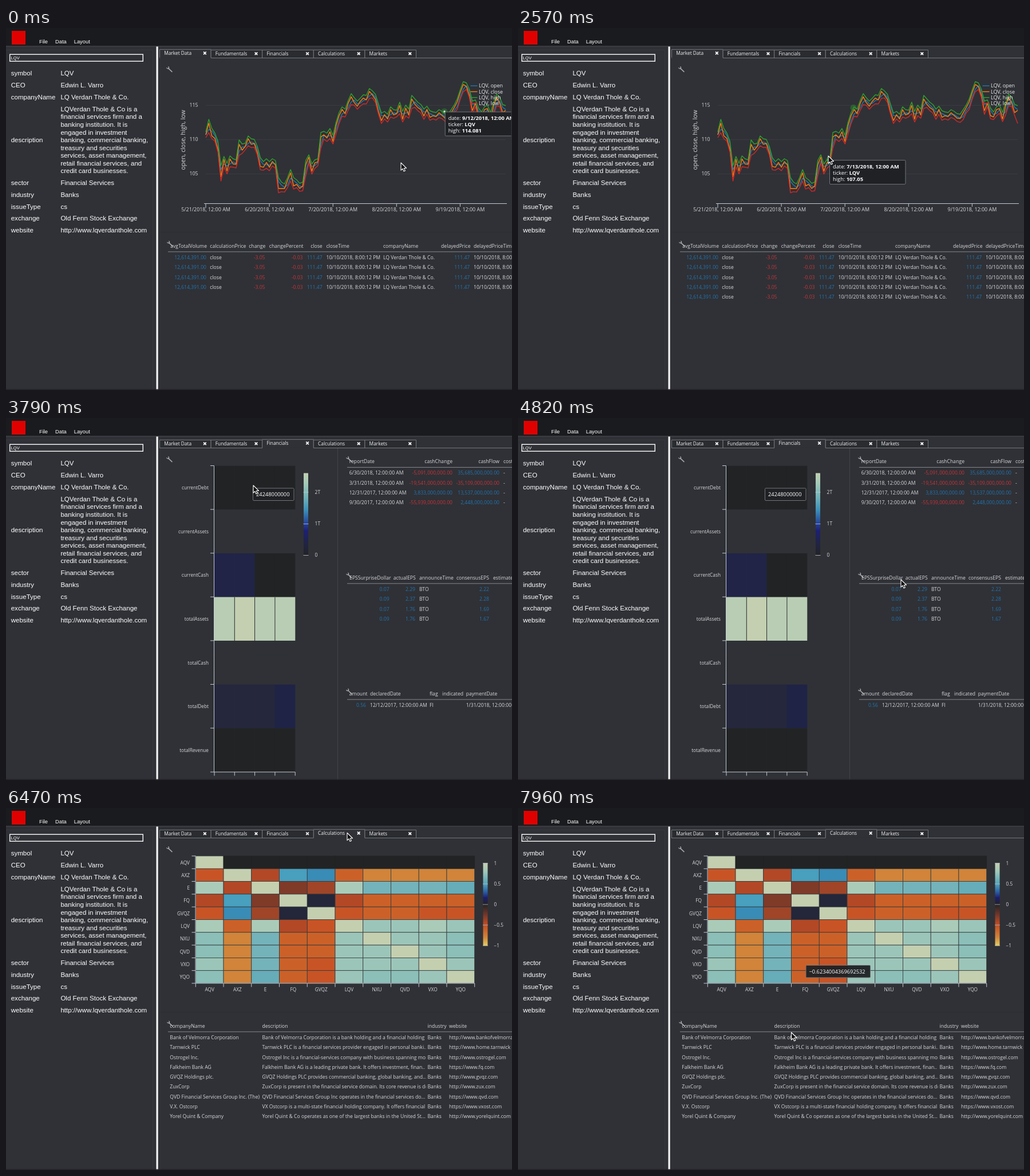
An HTML page that plays this animation: 884 by 634 pixels, repeating every 8 s.

```html
<!DOCTYPE html>
<html lang="en">
<head>
<meta charset="utf-8">
<title>Market dashboard</title>
<style>
  html, body { margin: 0; width: 100%; height: 100%; overflow: hidden; }
  svg { display: block; width: 884px; height: 634px; font-family: "Open Sans", "Noto Sans", sans-serif; }
  text { white-space: pre; }
  .ui { font-family: "Liberation Sans", Arial, sans-serif; }
</style>
</head>
<body>
<svg id="stage" viewBox="0 0 884 634" xmlns="http://www.w3.org/2000/svg"></svg>
<script>
const NS = "http://www.w3.org/2000/svg";
const stage = document.getElementById("stage");
const BG = "#2f3136", BLUE = "#2372ae", RED = "#c5343a", LIGHT = "#d6d8da", AXIS = "#c3cbd6", DARK = "#222324";
const TICKER = "LQV", COMPANY = "LQ Verdan Thole & Co.";

function el(parent, tag, attrs = {}) {
  const node = document.createElementNS(NS, tag);
  for (const name in attrs) node.setAttribute(name, attrs[name]);
  parent.appendChild(node);
  return node;
}
const rect = (g, x, y, width, height, fill, more) => el(g, "rect", { x, y, width, height, fill, ...more });
const line = (g, d, stroke, width = 1, more) => el(g, "path", { d, stroke, "stroke-width": width, fill: "none", ...more });
// y is the middle of the capitals
function label(g, x, y, str, size = 8.64, anchor = "start", fill = LIGHT, more) {
  const node = el(g, "text", { x, y: y + size * 0.35, "font-size": size, "text-anchor": anchor, fill, ...more });
  node.textContent = str;
  return node;
}
const ui = (g, x, y, str, size = 11.55) => label(g, x, y, str, size, "start", "#fff", { class: "ui" });
const show = (node, on) => node.setAttribute("display", on ? "inline" : "none");

const defs = el(stage, "defs");
function clip(id, x, y, w, h) {
  rect(el(defs, "clipPath", { id }), x, y, w, h, "#000");
}
function gradient(id, colors) {
  const g = el(defs, "linearGradient", { id, x1: 0, y1: 0, x2: 0, y2: 1 });
  colors.forEach(([offset, color]) => el(g, "stop", { offset, "stop-color": color }));
}
clip("pane", 267, 32, 615.5, 602);
clip("desc", 440, 370, 293.5, 200);
gradient("sums", [[0, "#c0d0b0"], [.12, "#a5cab8"], [.3, "#6fb1b9"], [.45, "#3c8fb7"], [.6, "#27479a"],
  [.7, "#1d2072"], [.85, "#212444"], [1, DARK]]);
gradient("corr", [[0, "#c4cfb0"], [.1, "#a3c9b9"], [.25, "#55a5ba"], [.35, "#2a5fa5"], [.42, "#1c1e70"], [.5, DARK],
  [.62, "#71362a"], [.72, "#b34826"], [.8, "#cb5f29"], [.9, "#d2863b"], [1, "#e4cd62"]]);

// Frame of the application
rect(stage, 0, 0, 884, 634, BG);
rect(stage, 0, 0, 884, 31.5, "#1a1b1e");
rect(stage, 0, 31.5, 884, 1, "#4a4c50");
rect(stage, 10, 5, 24, 24, "#e00000");
[[58, "File"], [86, "Data"], [118.7, "Layout"]].forEach(([x, s]) => ui(stage, x, 24, s, 9.36));
line(stage, "M0 38.5H256.5V634", "#36383d");
rect(stage, 6.7, 46.2, 232.6, 12, BG, { stroke: "#fff", "stroke-width": 1.4 });
ui(stage, 8.6, 52.4, TICKER, 7.6);
rect(stage, 262.5, 32.5, 3.2, 602, "#f6f6f6");

[["symbol", TICKER, 79], ["CEO", "Edwin L. Varro", 100], ["companyName", COMPANY, 120.8], ["description", "", 196],
 ["sector", "Financial Services", 271], ["industry", "Banks", 291.7], ["issueType", "cs", 312.5],
 ["exchange", "Old Fenn Stock Exchange", 333.3], ["website", "http://www.lqverdanthole.com", 354]
].forEach(([name, value, y]) => { ui(stage, 8.7, y, name); ui(stage, 95.4, y, value); });
["LQVerdan Thole & Co is a", "financial services firm and a", "banking institution. It is", "engaged in investment",
 "banking, commercial banking,", "treasury and securities", "services, asset management,", "retail financial services, and",
 "credit card businesses."].forEach((s, i) => ui(stage, 95.4, 141.8 + i * 13.56, s));

// Tabs
const tabs = ["Market Data", "Fundamentals", "Financials", "Calculations", "Markets"].map((name, i) => {
  const x = 268.5 + i * 89.6, g = el(stage, "g");
  const box = line(g, `M${x} 52.5V38.5H${x + 89.6}V52.5`, "#7b7e83", .9);
  const text = label(g, x + 7.7, 44.8, name, 8.35, "start", "#f2f2f2");
  const cross = line(g, `M${x + 76.6} 42.6l4.6 4.6m0 -4.6l-4.6 4.6`, "#fff", 1.7);
  return { x, box, text, cross };
});
const baseLine = line(stage, "", "#7b7e83", .9);
function setTabs(active, hover) {
  tabs.forEach((tab, i) => {
    const lift = i === active ? "translate(0 -0.9)" : "";
    tab.text.setAttribute("transform", lift);
    tab.cross.setAttribute("transform", lift);
    tab.box.setAttribute("transform", lift);
    tab.box.setAttribute("fill", i === hover ? "#646568" : i === active ? BG : "#2a2c30");
  });
  const x = tabs[active].x;
  baseLine.setAttribute("d", `M268 52.5H${x}M${x + 89.6} 52.5H884`);
}

// Shared parts of the panels
const views = [0, 1, 2].map(() => el(stage, "g"));
const [market, finance, calc] = views;

function wrench(g, x, y) {
  line(g, `M${x + 3.4} ${y + 3.4}L${x + 10} ${y + 9.6}`, "#a9abad", 1.5, { "stroke-linecap": "round" });
  line(g, `M${x + .6} ${y + 2.4}q1 2.6 3.4 1.5q1.6 -1.8 -.6 -3.4`, "#a9abad", 1.2);
}
// columns: [title, title x, value x, anchor]
function table(g, x, y, cols, rows) {
  wrench(g, x - 2, y - 9);
  line(g, `M${x} ${y + 10.4}H884`, "#909397", .9);
  cols.forEach(([title, tx, , anchor]) => label(g, tx, y, title, 8.64, anchor));
  return rows.map((row, r) => {
    const group = el(g, "g");
    row.forEach((value, c) => {
      const [title, , vx, anchor] = cols[c];
      const number = anchor === "end";
      const fill = !number ? LIGHT : value[0] === "-" ? RED : BLUE;
      const more = title === "description" ? { "clip-path": "url(#desc)" } : {};
      label(group, vx, y + 20.4 + r * 17.3, value, 8.64, anchor, fill, more);
    });
    return group;
  });
}
const left = (title, x) => [title, x, x, "start"];
const right = (title, x, vx = x) => [title, x, vx, "end"];

function tooltip(g, x, y, w, h, lines) {
  const tip = el(g, "g", { "clip-path": "url(#pane)" });
  rect(tip, x, y, w, h, "#1f2124", { "fill-opacity": .95, stroke: "#73767a", rx: 1.5 });
  lines.forEach(([name, value], i) => {
    const t = label(tip, x + 5.5, y + 10.8 + i * 11, name, 9.3, "start", "#fff");
    if (value) el(t, "tspan", { "font-weight": 700 }).textContent = value;
  });
  return tip;
}

// Price chart
const high = [182, 160, 176, 184, 198, 241, 225, 237, 224, 229, 231, 196, 203, 202, 189, 194, 195, 207, 227, 234,
  229, 234, 229, 232, 262, 270, 273, 262, 248, 262, 266, 272, 270, 232, 222, 238, 231, 229, 183, 181,
  184, 176, 188, 165, 148, 138, 142, 127, 115, 122, 128, 123, 117, 118, 106, 110, 116, 133, 149, 146,
  151, 138, 143, 144, 130, 146, 135, 142, 118, 124, 130, 134, 142, 137, 145, 147, 148, 143, 146, 150,
  151, 143, 135, 124, 108, 94, 96, 107, 128, 126, 140, 147, 138, 135, 148, 131, 116, 121, 134, 136];
let seed = 7;
const rand = () => (seed = (seed * 16807) % 2147483647) / 2147483647;
const prices = { open: [], close: [], high: [], low: [] };
high.forEach((y, i) => {
  const step = i ? y - high[i - 1] : 0;
  const range = Math.min(27, 10 + Math.abs(step) * .4 + rand() * 5);
  const fall = Math.max(-1, Math.min(1, step / 10));
  prices.high.push(y);
  prices.low.push(y + range + (i === 99 ? 16 : 0));
  prices.close.push(y + range * (.5 + .22 * fall));
  prices.open.push(y + range * (.5 - .25 * fall));
});
const colors = { open: "#1f77b4", close: "#ff7f0e", high: "#2ca02c", low: "#d62728" };

wrench(market, 280, 67);
[115, 110, 105].forEach((v, i) => {
  const y = 135 + i * 60;
  line(market, `M349 ${y + .5}H873`, "#393b40");
  label(market, 335.5, y, v, 8.8, "end");
});
label(market, 0, 0, "open, close, high, low", 10.6, "middle", LIGHT, { transform: "translate(309.5 196) rotate(-90)" });
line(market, "M346 307.5H875", AXIS);
["5/21", "6/20", "7/20", "8/20", "9/19"].forEach((day, i) => {
  const x = 349 + i * 111.1;
  line(market, `M${x} 307V${i ? 313 : 315}`, AXIS);
  label(market, x, 318, day + "/2018, 12:00 AM", 8.95, "middle");
});
for (const name in prices) {
  const points = prices[name].map((y, i) => `${(349 + i * 5.293).toFixed(1)},${y.toFixed(1)}`).join(" ");
  el(market, "polyline", { points, fill: "none", stroke: colors[name], "stroke-width": 1.4, "stroke-linejoin": "round" });
}
Object.keys(colors).forEach((name, i) => {
  const y = 101.3 + i * 10.2;
  line(market, `M811.5 ${y}h12`, colors[name], 1.4);
  label(market, 826, y, `${TICKER}, ${name}`, 8.95, "start", "#eee");
});

line(market, "M268 357.5H884", "#2b2d31");
const marketRow = ["12,614,391.00", "close", "-3.05", "-0.03", "111.47", "10/10/2018, 8:00:12 PM", COMPANY, "111.47", "10/10/2018, 8:00:12 PM"];
const marketRows = table(market, 283, 381.5, [
  right("avgTotalVolume", 351, 350), left("calculationPrice", 356.3), right("change", 453.3, 452.5),
  right("changePercent", 519.5, 518.5), right("close", 552.6), left("closeTime", 559.5),
  left("companyName", 659), right("delayedPrice", 811.5, 810.3), left("delayedPriceTime", 817)
], Array(5).fill(marketRow));

function pricePoint(x, y, day, value) {
  const g = el(market, "g");
  el(g, "circle", { cx: x, cy: y, r: 5.5, fill: "#2ca02c", "fill-opacity": .4 });
  rect(g, x - 1.5, y - 1.5, 3, 3, "#d5efd0");
  tooltip(g, x + 1.2, y + .8, 132.5, 42, [["date: ", day + "/2018, 12:00 AM"], ["ticker: ", TICKER], ["high: ", value]]);
  return g;
}
const ghost = el(market, "circle", { cx: 586, cy: 139.5, r: 5.5, fill: "#2ca02c", "fill-opacity": .4 });
const septTip = pricePoint(766, 146.2, "9/12", "114.081");
const lateTip = pricePoint(586, 139.5, "7/24", "114.69");
const julyTip = pricePoint(543.3, 230.8, "7/13", "107.05");

// Financials
wrench(finance, 280, 67);
const GREEN = "#b9cdb4", NAVY = "#212447", DIM = "#25273d", DUSK = "#1f2346";
[["currentDebt", DARK, DARK, DARK, DARK], ["currentAssets"], ["currentCash", NAVY, NAVY, DARK, DARK],
 ["totalAssets", GREEN, "#c3cfb0", GREEN, GREEN], ["totalCash"], ["totalDebt", DIM, DIM, DIM, DUSK],
 ["totalRevenue", DARK, DARK, DARK, DARK]
].forEach(([name, ...cells], r) => {
  const y = 83.8 + r * 76.6;
  cells.forEach((fill, c) => {
    rect(finance, 364 + c * 35.3, y, 35.4, 76.4, fill);
    if (c && r === 3) line(finance, `M${364 + c * 35.3} ${y}v76.4`, "#2b2d2e");
  });
  label(finance, 354, y + 38.4, name, 8.3, "end");
  line(finance, `M357 ${y - .3}h6.5`, AXIS);
});
line(finance, "M363.5 83.5V620M357 620H505", AXIS);
for (let c = 0; c < 5; c++) line(finance, `M${364 + c * 35.3} 620v6.5`, AXIS);
rect(finance, 520, 96.5, 8, 144.5, "url(#sums)");
[["2T", 130], ["1T", 185.5], ["0", 240.5]].forEach(([s, y]) => {
  line(finance, `M519.5 ${y}h9`, AXIS, .8);
  label(finance, 539.6, y, s, 8.5);
});
line(finance, "M579.5 53V634", "#45474b", .9);

table(finance, 596, 76, [left("reportDate", 599.7), right("cashChange", 780), right("cashFlow", 862), left("costOfRevenue", 869)], [
  ["6/30/2018, 12:00:00 AM", "-5,091,000,000.00", "35,685,000,000.00", "-"],
  ["3/31/2018, 12:00:00 AM", "-19,541,000,000.00", "-35,109,000,000.00", "-"],
  ["12/31/2017, 12:00:00 AM", "3,833,000,000.00", "13,537,000,000.00", "-"],
  ["9/30/2017, 12:00:00 AM", "-55,939,000,000.00", "2,448,000,000.00", "-"]
]);
table(finance, 596, 279.5, [right("EPSSurpriseDollar", 672.5, 669.7), right("actualEPS", 715.7, 715), left("announceTime", 722),
  right("consensusEPS", 844), left("estimatedEPS", 851)], [
  ["0.07", "2.29", "BTO", "2.22"], ["0.09", "2.37", "BTO", "2.28"],
  ["0.07", "1.76", "BTO", "1.69"], ["0.09", "1.76", "BTO", "1.67"]
]);
table(finance, 596, 482.6, [right("amount", 631.5, 629), left("declaredDate", 636), left("flag", 740),
  left("indicated", 762), left("paymentDate", 803.7)], [
  ["0.56", "12/12/2017, 12:00:00 AM", "FI", "", "1/31/2018, 12:00:00 AM"]
]);
const debtTip = tooltip(finance, 431.5, 123, 71.5, 21.5, [["24248000000"]]);

// Calculations
const shades = { a: "#c4cfb0", b: "#abcbb9", c: "#9cc5b9", d: "#8bbfb8", e: "#74b3ba", f: "#66adb9", g: "#489fbe", h: "#388cb6",
  n: "#24263a", k: "#803a28", l: "#a04527", m: "#b34826", o: "#c85426", p: "#cb6129", q: "#d1843a", ".": DARK };
wrench(calc, 280, 67);
[["AQV", "a........."], ["AXZ", "oamghpqqqq"], ["E", "bmaklbeeef"], ["FQ", "mgkanmpppp"], ["GVQZ", "ohlnaoppoo"],
 [TICKER, "bpbmoaccbc"], ["NXU", "dqeppcaccd"], ["QVD", "dqeppccacd"], ["VXO", "cqepocccac"], ["YQO", "dqfpocddca"]
].forEach(([name, cells], r) => {
  const y = 84 + r * 22.3, x = 331.3 + r * 48.74;
  [...cells].forEach((c, i) => rect(calc, 331.3 + i * 48.74, y, 48.74, 22.3, shades[c],
    { stroke: c === "." ? DARK : "#33393a", "stroke-width": .8 }));
  label(calc, 321, y + 11.6, name, 8.3, "end");
  label(calc, x + 24.4, 318, name, 8.3, "middle");
  line(calc, `M324.5 ${y}h6.5M${x} 307v6.5`, AXIS);
});
line(calc, "M331 83.5V307M324.5 307H818.7V313.5", AXIS);
rect(calc, 833.5, 96.3, 8, 145, "url(#corr)");
["1", "0.5", "0", "−0.5", "−1"].forEach((s, i) => {
  const y = 97 + i * 36;
  line(calc, `M833 ${y}h9`, AXIS, .7);
  label(calc, 852.5, y, s, 8.3);
});
line(calc, "M268 357.5H884", "#2b2d31");
table(calc, 283, 381.5, [left("companyName", 286.3), left("description", 447.5), left("industry", 736.5), left("website", 774)], [
  ["Bank of Velmorra Corporation", "Bank of Velmorra Corporation is a bank holding and a financial holding company", "http://www.bankofvelmorra.com"],
  ["Tarnwick PLC", "Tarnwick PLC is a financial services provider engaged in personal banki..", "http://www.home.tarnwick"],
  ["Ostrogel Inc.", "Ostrogel Inc is a financial-services company with business spanning more", "http://www.ostrogel.com"],
  ["Falkheim Bank AG", "Falkheim Bank AG is a leading private bank. It offers investment, finan..", "https://www.fq.com"],
  ["GVQZ Holdings plc.", "GVQZ Holdings PLC provides commercial banking, global banking, and...", "http://www.gvqz.com"],
  ["ZuxCorp", "ZuxCorp is present in the financial service domain. Its core revenue is derived", "http://www.zux.com"],
  ["QVD Financial Services Group Inc. (The)", "QVD Financial Services Group Inc operates in the financial services do...", "https://www.qvd.com"],
  ["V.X. Ostcorp", "VX Ostcorp is a multi-state financial holding company. It offers financial", "https://www.vxost.com"],
  ["Yorel Quint & Company", "Yorel Quint & Co operates as one of the largest banks in the United St...", "http://www.yorelquint.com"]
].map(([name, text, site]) => [name, text, "Banks", site]));
const corrTip = tooltip(calc, 503, 275.5, 112.5, 21.5, [["−0.6234004369692532"]]);

rect(stage, 0, 632.6, 884, 1.4, "#252229");

// Pointer
const pointer = el(stage, "path", {
  d: "M0 0V13.2L3 10.4L5 15L7.3 14L5.3 9.5H9.5Z", fill: "#0c0c0c", stroke: "#fff", "stroke-width": 1.1, "stroke-linejoin": "round"
});
// [tick, x, y], one tick is 150 ms
const path = [[0, 690, 236], [7, 665, 205], [10, 613, 139], [14, 613, 139], [17, 542, 224], [21, 491.5, 52], [22, 491.5, 52],
  [25, 432, 118], [28, 505, 150], [32, 669, 283], [33, 720, 300], [35, 780, 105], [38, 596, 43.5], [46, 596, 43.5],
  [48, 690, 140], [50, 500, 268], [53, 477.5, 393], [54, 477.5, 393]];
function pointerAt(tick) {
  const i = path.findIndex((p, n) => n && tick <= p[0]);
  const [t0, x0, y0] = path[i - 1], [t1, x1, y1] = path[i];
  const f = (tick - t0) / (t1 - t0);
  return [x0 + (x1 - x0) * f, y0 + (y1 - y0) * f];
}

function draw(ms) {
  const tick = Math.max(0, Math.floor((ms - 10) / 150));
  const view = tick < 22 ? 0 : tick < 43 ? 1 : 2;
  views.forEach((g, i) => show(g, i === view));
  setTabs([0, 2, 3][view], tick >= 37 && tick < 43 ? 3 : -1);
  show(marketRows[4], tick >= 3);
  show(septTip, tick < 15);
  show(lateTip, tick === 15);
  show(ghost, tick > 15);
  show(julyTip, tick > 15);
  show(debtTip, tick >= 25 && tick < 33);
  show(corrTip, tick >= 50);
  pointer.setAttribute("transform", `translate(${pointerAt(tick)})`);
}

const start = performance.now();
function loop() {
  draw((performance.now() - start) % 8000);
  requestAnimationFrame(loop);
}
loop();
</script>
</body>
</html>
```
